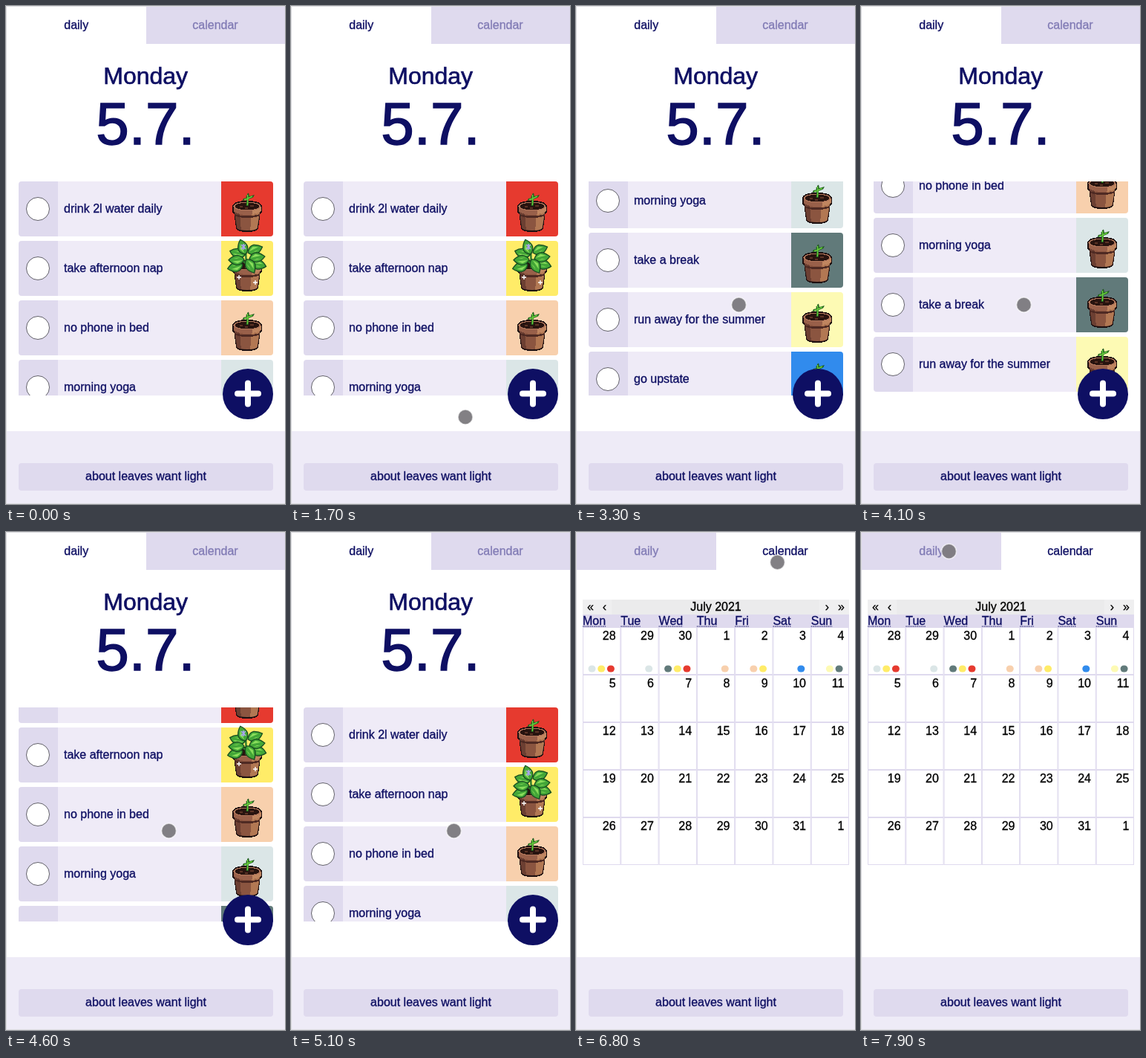
Recreate the animation shown at these times as an HTML page. Size 376 by 670 pixels, loop 8 s.

```html
<!DOCTYPE html>
<html lang="en">
<head>
<meta charset="utf-8">
<title>Habit list</title>
<style>
  html, body { margin: 0; width: 100%; height: 100%; overflow: hidden; background: #fff; }
  svg { display: block; width: 100%; height: 100%; }
  text {
    font: 16px "Liberation Sans", Arial, sans-serif; color: #0e0f63;
    fill: currentColor; stroke: currentColor; stroke-width: .02em;
  }
  .mid { text-anchor: middle; }
  .black { color: #000; }
</style>
</head>
<body>
<svg id="stage" viewBox="0 0 376 670">
  <defs>
    <clipPath id="view"><rect x="0" y="236" width="376" height="288"/></clipPath>
    <clipPath id="card"><rect x="17" width="343" height="74" rx="4"/></clipPath>
    <clipPath id="body"><path d="M18 41H52L48.500 63Q46 66 35 66Q24 66 21.500 63Z"/></clipPath>
    <g id="pot" shape-rendering="crispEdges">
      <path d="M15 33Q17 26 35 26Q53 26 55 33V41L52.500 44L50 63Q48 68 35 68Q22 68 20 63L17.500 44L15 41Z" fill="#1c0f10"/>
      <g clip-path="url(#body)">
        <rect x="15" y="38" width="40" height="30" fill="#8b5540"/>
        <path d="M15 40H25L27 68H15Z" fill="#6c3f32"/>
        <path d="M41 40H55V68H39Z" fill="#b27853"/>
        <path d="M15 43Q35 50 55 43V46Q35 52 15 46Z" fill="#4f2a23"/>
      </g>
      <path d="M16.500 34V40Q24 45 35 45Q46 45 53.500 40V34Z" fill="#99604a"/>
      <path d="M42 36L53.500 34V40Q49 43 42 44.500Z" fill="#c08660"/>
      <ellipse cx="35" cy="33.500" rx="18.500" ry="6" fill="#b0755a"/>
      <ellipse cx="35" cy="33.500" rx="16.500" ry="4.800" fill="#27130f"/>
      <path d="M25 33H29V35H25ZM39 32H44V34H39ZM32 35H36V37H32Z" fill="#5c3325"/>
    </g>
    <g id="sprout" fill="none">
      <path d="M35 33Q36 28 35 19" stroke="#1f5c1e" stroke-width="3"/>
      <path d="M35 25L28.500 26L30 23L34.500 22L35 17L37 15.500L38 20L45 18L43 21.500L37 24Z" fill="#1f5c1e"/>
      <path d="M35.300 32Q36 28 35.500 18M31 24.500L35 23.500L42 20" stroke="#68cf3c" stroke-width="1.5"/>
    </g>
    <g id="leaf">
      <path d="M0 0Q4 -8 11 -7Q17 -5 21 0Q15 6 9 6Q3 5 0 0Z" fill="#43a637" stroke="#174d22" stroke-width="1.300"/>
      <path d="M2 -1L9 -5L16 -2ZM5 3L10 1.500L15 2Z" fill="#8ade5c"/>
    </g>
    <g id="bush"></g>
  </defs>

  <rect width="376" height="670" fill="#fff"/>
  <rect y="572" width="376" height="97" fill="#eeebf7"/>
  <rect x="17" y="615" width="343" height="37" rx="4" fill="#dfdaee"/>
  <text class="mid" x="188.5" y="638">about leaves want light</text>
  <rect id="offTab" y="1" height="50" fill="#dfdaee"/>
  <text id="dayTab" class="mid" x="94.7" y="31">daily</text>
  <text id="calTab" class="mid" x="282" y="31">calendar</text>

  <g id="daily">
    <text class="mid" x="188.2" y="105" style="font-size:32px">Monday</text>
    <text class="mid" x="188" y="185.5" style="font-size:80px">5.7.</text>
    <g clip-path="url(#view)"><g id="list"></g></g>
    <circle cx="326" cy="522" r="34" fill="#0e0f63"/>
    <path d="M312 521.5H340M326 507.500V535.500" stroke="#fff" stroke-width="8" stroke-linecap="round"/>
  </g>
  <g id="calendar"></g>
  <path d="M.5 670V.5H376M0 669.500H376" fill="none" stroke="#dedde2"/>
  <circle id="cursor" r="10" fill="#777579" fill-opacity=".92" stroke="#fff" stroke-opacity=".6" stroke-width="1.6"/>
</svg>
<script>
const $ = id => document.getElementById(id);
const make = (parent, tag, attrs, text = "") => {
  const el = document.createElementNS("http://www.w3.org/2000/svg", tag);
  for (const key in attrs) el.setAttribute(key, attrs[key]);
  el.textContent = text;
  parent.append(el);
  return el;
};

const C = {
  red: "#e63a2f", yellow: "#ffec68", peach: "#f8d0ad", mist: "#dbe6e7",
  slate: "#617a7a", cream: "#fdfab4", blue: "#318bed"
};
const LILAC = "#dfdaee", PALE = "#efebf7";
const ROW = 80, MAX_SCROLL = 266;

const habits = [
  ["drink 2l water daily", C.red], ["take afternoon nap", C.yellow],
  ["no phone in bed", C.peach], ["morning yoga", C.mist],
  ["take a break", C.slate], ["run away for the summer", C.cream],
  ["go upstate", C.blue]
];

function buildBush() {
  const bush = $("bush");
  make(bush, "path", { d: "M34 36L33 12M35 30L46 16M34 31L21 20", stroke: "#2f7d2c", "stroke-width": 2.5, fill: "none" });
  const leaves = [
    [32, 19, 195], [36, 16, -22], [29, 32, 165], [40, 30, 12],
    [33, 18, -110], [38, 24, -8], [31, 25, 178], [34, 25, 60]
  ];
  for (const [x, y, turn] of leaves)
    make(bush, "use", { href: "#leaf", transform: `translate(${x} ${y}) rotate(${turn})` });
  make(bush, "path", { d: "M27 5L33 11M33 5L27 11M30 4V12", stroke: "#a9a4ee", "stroke-width": 1.6 });
  make(bush, "path", { d: "M24 46V52M21 49H27M46 53V59M43 56H49", stroke: "#fff", "stroke-width": 1.4 });
}

function buildList() {
  habits.forEach(([name, color], i) => {
    const row = make($("list"), "g", { transform: `translate(0 ${236 + i * ROW})` });
    const card = make(row, "g", { "clip-path": "url(#card)" });
    const block = (x, width, fill) => make(card, "rect", { x, width, height: 74, fill });
    block(17, 53, LILAC);
    block(70, 220, PALE);
    block(290, 70, color);
    make(row, "circle", { cx: 43, cy: 37, r: 15.5, fill: "#fff", stroke: "#62616a" });
    make(row, "text", { x: 78, y: 42 }, name);
    const plant = i === 1 ? "#bush" : "#sprout";
    for (const href of ["#pot", plant])
      make(row, "use", { href, transform: "translate(290 0)" });
  });
}

function buildCalendar() {
  const cal = $("calendar"), left = 9, top = 129, w = 359 / 7, h = 64;
  const box = (x, y, width, height, fill) => make(cal, "rect", { x, y, width, height, fill });
  box(left, 91, 359, 20, "#efeff0");
  box(48, 91, 280, 20, "#ebebec");
  box(left, 111, 359, 18, LILAC);
  const label = (x, y, text, anchor = "middle") =>
    make(cal, "text", { x, y, class: "black", "text-anchor": anchor }, text);
  label(188.5, 106, "July 2021");
  [[19.5, "«"], [38.5, "‹"], [338.5, "›"], [357.5, "»"]].forEach(([x, s]) => label(x, 106, s));

  ["Mon", "Tue", "Wed", "Thu", "Fri", "Sat", "Sun"].forEach((name, i) => {
    const x = left + i * w;
    const text = make(cal, "text", { x, y: 125 }, name);
    make(cal, "path", {
      d: `M${x} 127H${x + text.getComputedTextLength()}`,
      stroke: "#0e0f63", "stroke-dasharray": "1.5 1"
    });
  });

  const dots = [
    [C.mist, C.yellow, C.red], [C.mist], [C.slate, C.yellow, C.red],
    [C.peach], [C.peach, C.yellow], [C.blue], [C.cream, C.slate]
  ];
  for (let i = 0; i < 35; i++) {
    const x = left + (i % 7) * w, y = top + Math.floor(i / 7) * h;
    make(cal, "rect", { x: x + .5, y: y - .5, width: w - 1, height: h - 1, fill: "none", stroke: LILAC });
    label(x + w - 6.7, y + 16, i < 3 ? 28 + i : (i - 3) % 31 + 1, "end");
    (dots[i] || []).forEach((fill, k, all) => make(cal, "rect", {
      x: x + w - 18.4 - (all.length - 1 - k) * 12.7, y: y + 50.5,
      width: 10, height: 9, rx: 4.5, fill
    }));
  }
}

const ease = (t, from, to) => {
  const p = Math.min(1, Math.max(0, (t - from) / (to - from)));
  return p * p * (3 - 2 * p);
};

const scrollAt = t => MAX_SCROLL * (ease(t, 2310, 3470) - ease(t, 3620, 4995));

// Cursor stops: time, x, y
const stops = [
  [1700, 235, 553], [2250, 219.5, 402], [5200, 219.5, 402], [6050, 275.5, 41],
  [6750, 275.5, 41], [7350, 70, 25], [7720, 118.5, 26]
];
function cursorAt(t) {
  let [, x, y] = stops[0];
  for (let i = 1; i < stops.length; i++) {
    const [t0, x0, y0] = stops[i - 1], [t1, x1, y1] = stops[i];
    const p = ease(t, t0, t1);
    x += (x1 - x0) * p;
    y += (y1 - y0) * p;
  }
  return [x, y];
}

const show = (id, on) => $(id).setAttribute("visibility", on ? "visible" : "hidden");

function draw(t) {
  const month = t >= 6300;
  show("daily", !month);
  show("calendar", month);
  $("offTab").setAttribute("x", month ? 1 : 189);
  $("offTab").setAttribute("width", month ? 188 : 187);
  $("dayTab").style.color = month ? "#817bb5" : "";
  $("calTab").style.color = month ? "" : "#817bb5";
  $("list").setAttribute("transform", `translate(0 ${-Math.round(scrollAt(t))})`);
  show("cursor", t >= 1700);
  $("cursor").setAttribute("transform", `translate(${cursorAt(t)})`);
}

buildBush();
buildList();
buildCalendar();

const LOOP = 8000, TICK = 100;
const start = performance.now();
function frame() {
  const t = (performance.now() - start) % LOOP;
  draw(Math.floor(t / TICK) * TICK);
  requestAnimationFrame(frame);
}
frame();
</script>
</body>
</html>
```
